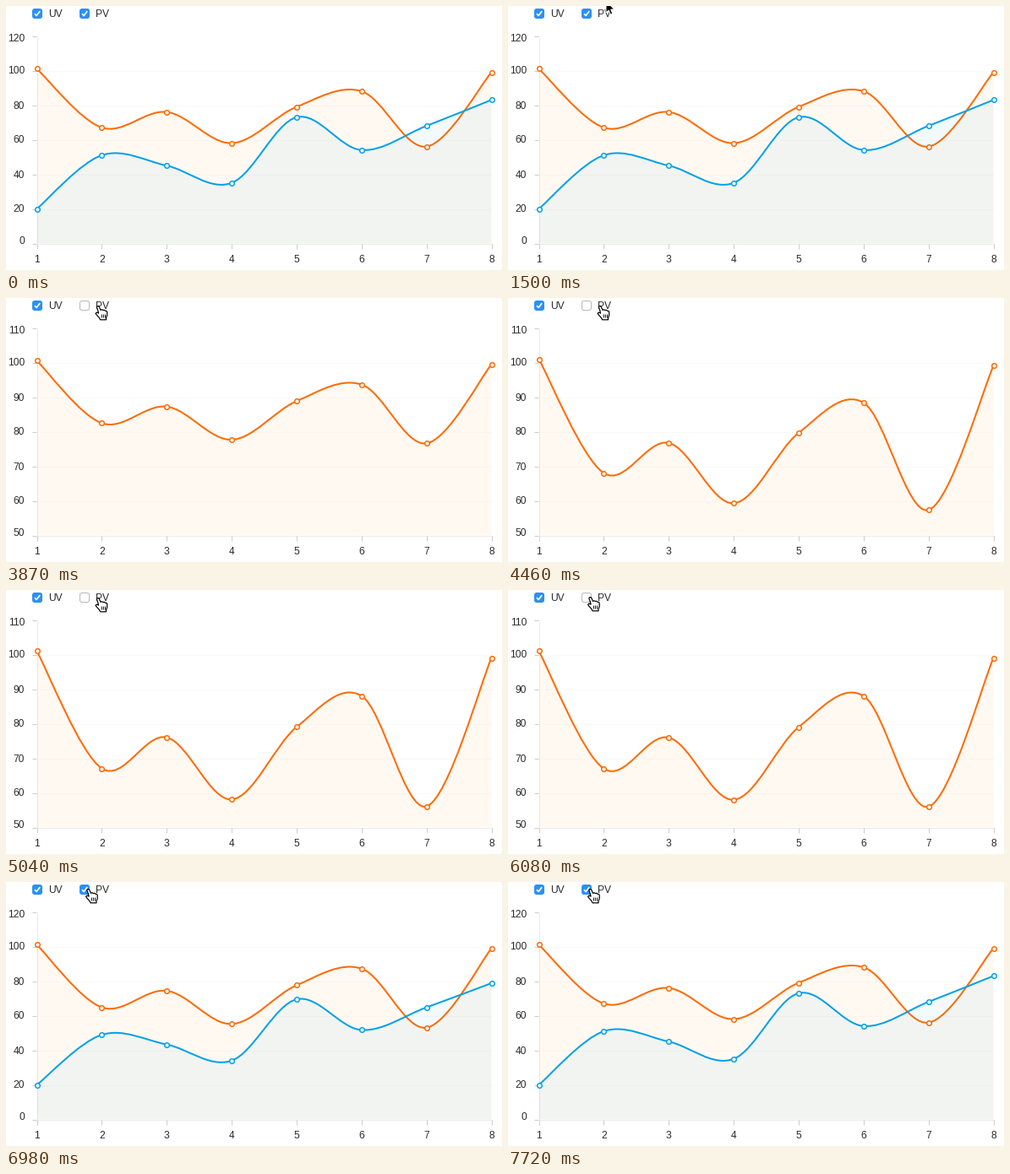
Write a matplotlib script that moves like this. It is 587x313 px and loops after 8000 ms.

```python
import matplotlib.pyplot as plt
import numpy as np
from matplotlib.animation import FuncAnimation
from matplotlib.patches import FancyBboxPatch, PathPatch, Polygon
from matplotlib.path import Path

W, H, DPI = 587, 313, 100
LOOP, TICK = 8000, 20
PX = 72 / DPI  # points per pixel

LEFT, RIGHT, TOP, BOTTOM = 36.5, 574.5, 35.5, 281.5
ORANGE, BLUE, CHECK = "#ff6a00", "#00a0e9", "#2b90f5"
UV = np.array([101, 67, 76, 58, 79, 88, 56, 99])
PV = np.array([20, 51, 45, 35, 73, 54, 68, 83])
XS = np.linspace(LEFT, RIGHT, 8)

HIDE, SHOW = 3870, 6380      # PV unchecked, PV checked again
STEP, STEPS = 1320 / 9, 9    # redraw spacing while the chart moves

# time, shape and tip position of the pointer
POINTER = [
    (1500, "arrow", 116, -6), (1650, "arrow", 113, 1),
    (1800, "arrow", 110.5, 6), (1950, "arrow", 109.5, 8.2),
    (3870, "hand", 110.5, 9.5), (5640, "hand", 103, 10.5),
    (5790, "arrow", 69.5, 9), (5930, "hand", 87, 9),
    (6080, "hand", 99, 8.5),
]
ARROW = np.array([(0, 0), (0, 14), (3.2, 11), (5.4, 16.2), (7.8, 15.2),
                  (5.6, 10.1), (10, 10)])
HAND = np.array([(-3.2, 1.4), (-2.4, 0.1), (-1, 0.1), (0, 1.4), (1.5, 4.8),
                 (3, 4.2), (4.3, 5), (5.8, 4.7), (7, 5.8), (8.4, 5.8),
                 (9.2, 7.2), (9.2, 11), (8, 14), (8, 16.3), (1.2, 16.3),
                 (-0.5, 13.5), (-3, 10.8), (-4.4, 8.8), (-3.2, 7.6),
                 (-1.8, 8), (-1, 8.6), (-1.6, 5.5)])

plt.rcParams["font.family"] = "Liberation Sans"
fig = plt.figure(figsize=(W / DPI, H / DPI), dpi=DPI, facecolor="white")
ax = fig.add_axes([0, 0, 1, 1])
ax.set(xlim=(0, W), ylim=(H, 0))
ax.axis("off")


def line(xs, ys, color, width=1, z=1):
    return ax.plot(xs, ys, color=color, lw=width * PX, zorder=z,
                   solid_capstyle="butt")[0]


def label(x, y, text, ha):
    return ax.text(x, y + 4.5, text, ha=ha, va="baseline", color="#2a2a2a",
                   fontsize=12 * PX, zorder=6)


def to_y(values, low, high):
    return BOTTOM - (values - low) * (BOTTOM - TOP) / (high - low)


def spline(ys):
    """Catmull-Rom curve through the points, as Bezier vertices."""
    pts = np.column_stack([XS, ys])
    padded = np.vstack([pts[:1], pts, pts[-1:]])
    tangent = (padded[2:] - padded[:-2]) / 6
    verts = [pts[0]]
    for i in range(len(pts) - 1):
        verts += [pts[i] + tangent[i], pts[i + 1] - tangent[i + 1], pts[i + 1]]
    return verts, [Path.MOVETO] + [Path.CURVE4] * (len(verts) - 1)


class Series:
    def __init__(self, color, fill, z):
        empty = Path([(0, 0), (0, 0)])
        self.area = ax.add_patch(PathPatch(empty, fc=fill, alpha=0.05, lw=0,
                                           zorder=z))
        self.curve = ax.add_patch(PathPatch(empty, fc="none", ec=color,
                                            lw=2 * PX, zorder=z + 0.1))
        self.dots = ax.plot(XS, XS, "o", ms=5.6 * PX, mfc="white", mec=color,
                            mew=1.5 * PX, zorder=z + 0.2)[0]

    def draw(self, ys):
        verts, codes = spline(ys)
        self.curve.set_path(Path(verts, codes))
        base = [(RIGHT, BOTTOM), (LEFT, BOTTOM), verts[0]]
        self.area.set_path(Path(verts + base,
                                codes + [Path.LINETO] * 2 + [Path.CLOSEPOLY]))
        self.dots.set_ydata(ys)

    def show(self, on):
        for part in (self.area, self.curve, self.dots):
            part.set_visible(on)


class Checkbox:
    def __init__(self, x, text):
        self.box = ax.add_patch(FancyBboxPatch(
            (x - 5.5, 3.5), 11, 11, boxstyle="round,pad=0,rounding_size=2.5",
            lw=PX, zorder=6))
        self.mark = line([x - 3, x - 0.9, x + 3.2], [9.1, 11.5, 6.1], "white",
                         1.7, 7)
        label(x + 13, 8.8, text, "left")

    def set(self, on):
        self.box.set_facecolor(CHECK if on else "white")
        self.box.set_edgecolor(CHECK if on else "#b9b9b9")
        self.mark.set_visible(on)


# Axes
line([LEFT, LEFT], [TOP, BOTTOM], "#ebebeb")
line([LEFT, RIGHT], [BOTTOM, BOTTOM], "#ebebeb")
y_labels = []
for i in range(7):
    y = BOTTOM - 41 * i
    line([31, 36], [y, y], "#cccccc")
    if 0 < i < 6:
        line([LEFT, RIGHT], [y, y], "#fafafa", z=0.5)
    shift = {0: -3, 6: 3}.get(i, 0)
    y_labels.append(label(22, y - 0.5 + shift, "", "right"))
for i, x in enumerate(XS):
    line([x, x], [282, 288], "#cccccc")
    label(x, 299.8, str(i + 1), "center")

uv_series = Series(ORANGE, "#ff8c00", 2)
pv_series = Series(BLUE, BLUE, 3)
uv_box, pv_box = Checkbox(37, "UV"), Checkbox(93, "PV")
uv_box.set(True)

arrow = ax.add_patch(Polygon(ARROW, fc="black", ec="white", lw=PX, zorder=9))
hand = ax.add_patch(Polygon(HAND, fc="white", ec="black", lw=1.2 * PX,
                            joinstyle="round", zorder=9))
creases = [line([0, 0], [0, 0], "black", 0.9, 10) for _ in range(3)]

WIDE_Y, WIDE_PV = to_y(UV, 0, 120), to_y(PV, 0, 120)
NARROW_Y = to_y(UV, 50, 110)


def progress(t, begin, lead):
    """Exponential ease-out over 1500 ms, redrawn at fixed steps."""
    step = int((t - begin + 4) // STEP)
    if step >= STEPS:
        return 1.0
    return 1 - 2 ** (-10 * (step * STEP + lead) / 1500)


def draw_pointer(t):
    past = [p for p in POINTER if p[0] <= t]
    kind, x, y = past[-1][1:] if past else (None, 0, 0)
    arrow.set_visible(kind == "arrow")
    hand.set_visible(kind == "hand")
    arrow.set_xy(ARROW + (x, y))
    hand.set_xy(HAND + (x, y))
    for i, crease in enumerate(creases):
        cx = x + 2.1 + 2 * i
        crease.set_data([cx, cx], [y + 9.6, y + 13.4])
        crease.set_visible(kind == "hand")


def update(k):
    t = k * TICK + TICK / 2
    both = not HIDE <= t < SHOW
    low, gap = (0, 20) if both else (50, 10)
    for i, text in enumerate(y_labels):
        text.set_text(str(low + gap * i))

    uv_y, pv_y = WIDE_Y, WIDE_PV
    if t >= SHOW:
        p = progress(t, SHOW, 0)
        uv_y = NARROW_Y + (WIDE_Y - NARROW_Y) * p
        pv_y = WIDE_PV[0] + (WIDE_PV - WIDE_PV[0]) * p
    elif t >= HIDE:
        uv_y = WIDE_Y + (NARROW_Y - WIDE_Y) * progress(t, HIDE, 14)
    uv_series.draw(uv_y)
    pv_series.draw(pv_y)
    pv_series.show(both)
    pv_box.set(both)
    draw_pointer(t)
    return []


anim = FuncAnimation(fig, update, frames=LOOP // TICK, interval=TICK,
                     init_func=lambda: update(0), repeat=True, repeat_delay=0)
plt.show()
```
